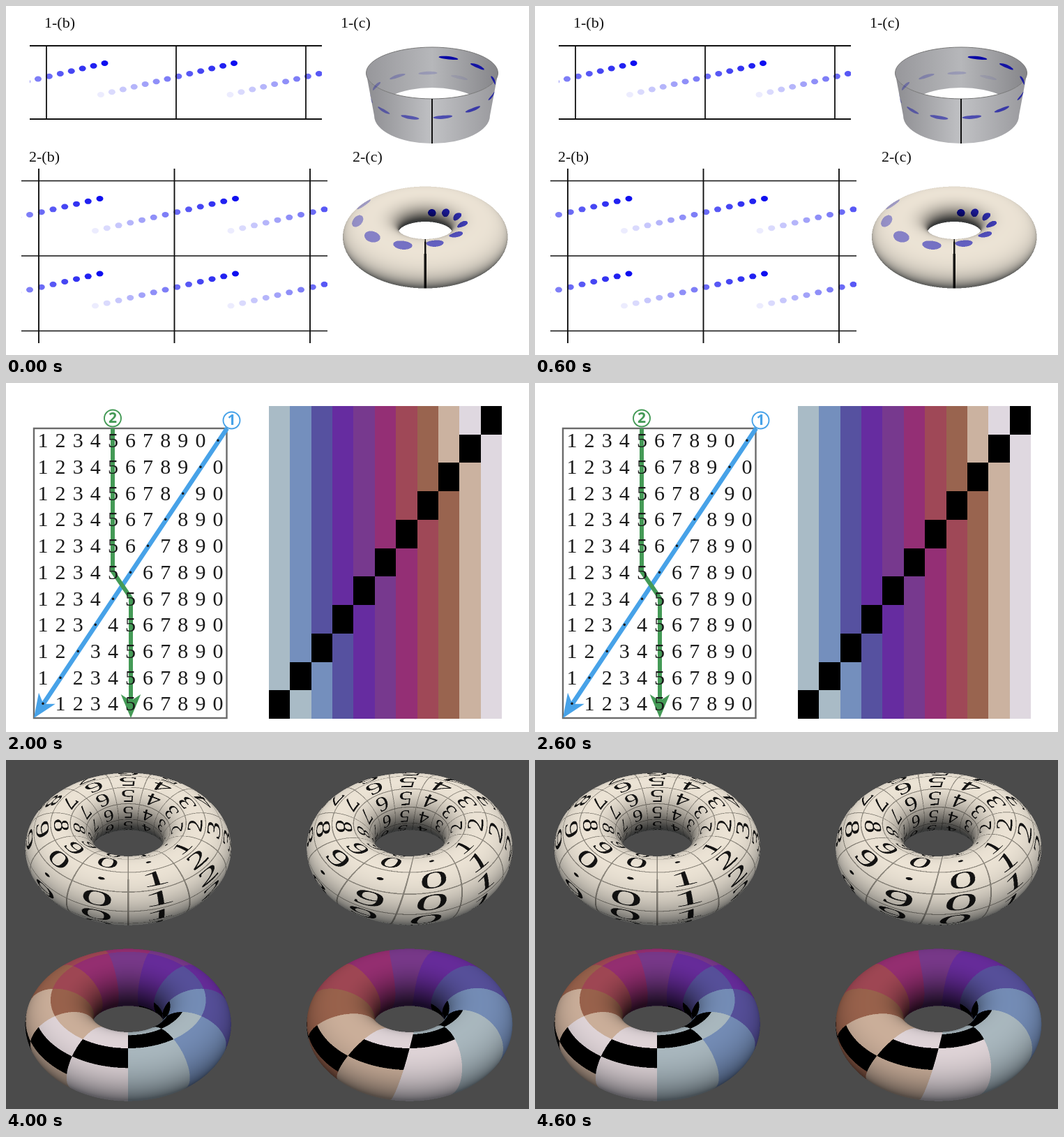
Recreate the animation shown at these times as an HTML page with a canvas. Size 750x500 px, loop 5000 ms.

```html
<!DOCTYPE html>
<html lang="en">
<head>
<meta charset="utf-8">
<title>Diagonal tables and tori</title>
<style>
html, body { margin: 0; width: 100%; height: 100%; overflow: hidden; background: #fff; }
canvas { display: block; }
</style>
</head>
<body>
<canvas id="stage" width="750" height="500"></canvas>
<script>
const W = 750, H = 500, HOLD = 1000, RAD = Math.PI / 180, STEP = 360 / 11;
const SERIF = '"Liberation Serif", "Noto Sans CJK JP", "Noto Sans CJK KR", "Noto Sans CJK", serif';
const COLORS = ['#000000', '#a9bbc6', '#748fbd', '#5651a0', '#662ca0', '#77398e',
  '#942f75', '#9f4857', '#99644f', '#cbb2a0', '#dfd8e0'];
const RGB = COLORS.map(c => [1, 3, 5].map(i => parseInt(c.slice(i, i + 2), 16)));
const mod = (a, n) => ((a % n) + n) % n;
const mix = (a, b, t) => a.map((k, i) => k + (b[i] - k) * t);
let g;

function makeCanvas(w, h) {
  const c = document.createElement('canvas');
  c.width = w;
  c.height = h;
  return c;
}

// Sheared table: 0 is the dot, 1 to 10 are the digits 1 to 9 and 0.
function cell(c, r) {
  const block = Math.floor(r / 10), k = mod(c - block, 11), gap = 10 - r + 10 * block;
  return k === gap ? 0 : k < gap ? k + 1 : k;
}
const label = n => n ? String(n % 10) : '·';

// ---- drawing helpers ----
function text(s, x, y, size, color = '#111', align = 'left') {
  g.font = `${size}px ${SERIF}`;
  g.fillStyle = color;
  g.textAlign = align;
  g.textBaseline = 'middle';
  g.fillText(s, x, y);
}
function line(points, color, width) {
  g.strokeStyle = color;
  g.lineWidth = width;
  g.beginPath();
  points.forEach(p => g.lineTo(...p));
  g.stroke();
}
function arrow(points, color, width, head) {
  const [x, y] = points.at(-1), [px, py] = points.at(-2);
  const a = Math.atan2(y - py, x - px);
  const end = [x - Math.cos(a) * head * .6, y - Math.sin(a) * head * .6];
  line([...points.slice(0, -1), end], color, width);
  g.save();
  g.translate(x, y);
  g.rotate(a);
  g.fillStyle = color;
  g.beginPath();
  [[0, 0], [-head, -head * .42], [-head * .72, 0], [-head, head * .42]].forEach(p => g.lineTo(...p));
  g.fill();
  g.restore();
}
function oval(x, y, rx, ry, color) {
  g.fillStyle = color;
  g.beginPath();
  g.ellipse(x, y, rx, ry, 0, 0, 7);
  g.fill();
}
function clipTo(x, y, w, h, draw) {
  g.save();
  g.beginPath();
  g.rect(x, y, w, h);
  g.clip();
  draw();
  g.restore();
}
function gradient(x0, x1, stops) {
  const f = g.createLinearGradient(x0, 0, x1, 0);
  stops.forEach((c, i) => f.addColorStop(i / (stops.length - 1), c));
  return f;
}
function grid(x, y, dx, dy, rows, put, inside = c => c < 11) {
  for (let r = 0; r < rows; r++)
    for (let c = 0; c < 23; c++)
      if (inside(c, r)) put(x + c * dx, y + r * dy, cell(c, r));
}
const digits = (size, color) => (x, y, n) => text(label(n), x, y, size, color, 'center');
const block = (w, h) => (x, y, n) => {
  const x0 = Math.round(x), y0 = Math.round(y);
  g.fillStyle = COLORS[n];
  g.fillRect(x0, y0, Math.round(x + w) - x0, Math.round(y + h) - y0);
};
const stepped = (c, r) => c >= (r > 10 ? 1 : 0) && c < (r < 10 ? 22 : 23);

// ---- torus, traced per pixel at double resolution ----
function torus({ x, y, size, tube, flat, tilt, dist, paint }) {
  const hw = Math.ceil(size * (1 + tube) * 1.06), hh = Math.ceil(size * 1.32);
  const w = hw * 4, h = hh * 4, canvas = makeCanvas(w, h), c2 = canvas.getContext('2d');
  const image = c2.createImageData(w, h), data = image.data;
  const ce = Math.cos(tilt * RAD), se = Math.sin(tilt * RAD);
  const oy = -dist * ce, oz = dist * se / flat, far = Math.hypot(oy, oz);
  for (let j = 0; j < h; j++) for (let i = 0; i < w; i++) {
    const sx = (i / 2 - hw) / size, sy = (hh - j / 2) / size;
    let dx = sx, dy = sy * se - oy, dz = sy * ce / flat - oz;
    const len = Math.sqrt(dx * dx + dy * dy + dz * dz);
    dx /= len; dy /= len; dz /= len;
    let t = far - 2.4, gap = 1, px, py, pz, q;
    for (let n = 0; n < 70 && gap > .001 && t < far + 2.4; n++) {
      px = dx * t; py = oy + dy * t; pz = oz + dz * t;
      q = Math.sqrt(px * px + py * py);
      gap = Math.sqrt((q - 1) * (q - 1) + pz * pz) - tube;
      t += gap;
    }
    if (gap > .004) continue;
    const v = Math.atan2(pz, q - 1), u = Math.atan2(py, px), cv = Math.cos(v), sv = Math.sin(v);
    const nz = sv / flat, lit = (.99 * nz - .12 * cv * py / q) / Math.sqrt(cv * cv + nz * nz);
    const hollow = Math.max(0, -cv) * (1 - sv) / 2;
    const shade = Math.max(.42, .56 + .44 * lit) * (1 - .65 * hollow);
    const color = paint(u / RAD, v / RAD), o = (j * w + i) * 4;
    for (let k = 0; k < 3; k++) data[o + k] = color[k] * (shade - .02 * k * lit);
    data[o + 3] = 255;
  }
  c2.putImageData(image, 0, 0);
  g.drawImage(canvas, x - hw, y - hh, hw * 2, hh * 2);
}

const CREAM = [236, 232, 222], INK = [20, 20, 20], GLYPH = 128;
let glyphs;
function makeGlyphs() {
  const c = makeCanvas(GLYPH * 11, GLYPH);
  g = c.getContext('2d', { willReadFrequently: true });
  for (let n = 0; n < 11; n++) text(label(n), (n + .5) * GLYPH, GLYPH * .54, GLYPH * 1.08, '#000', 'center');
  glyphs = g.getImageData(0, 0, c.width, GLYPH).data;
}

// Surface angles to table coordinates: closed table and sheared table.
const closed = (u, v) => [mod((u + 90) / STEP, 11), mod((78.6 - v) / STEP, 11)];
const sheared = (u, v) => {
  const r = (114.6 - v) / 36;
  return [9.9 + (u + 90) / STEP + r / 10, r];
};
const colored = map => (u, v) => {
  const [c, r] = map(u, v);
  return RGB[cell(Math.floor(c), Math.floor(r))];
};
const numbered = map => (u, v) => {
  const [c, r] = map(u, v), ci = Math.floor(c), ri = Math.floor(r), fx = c - ci, fy = r - ri;
  if (Math.min(fx, 1 - fx) < .013 || Math.min(fy, 1 - fy) < .022) return [142, 139, 131];
  const at = Math.floor(fy * GLYPH) * GLYPH * 11 + Math.floor((cell(ci, ri) + fx) * GLYPH);
  return mix(CREAM, INK, glyphs[at * 4 + 3] / 255);
};

// ---- a fading row of spots, flat or wound once around a surface ----
const SPOTS = [...Array(13).keys()];
const fade = i => (13 - i) / 13;
const turn = i => 31 * i - 75;

function trail(x, y, dx, dy) {
  SPOTS.forEach(i => oval(x - i * dx, y + i * dy, 5, 4, `rgba(14,14,240,${fade(i)})`));
}
function spotted(u, v) {
  if (Math.abs(u + 90) < .8) return INK;
  const i = SPOTS.find(i => {
    const du = mod(u + turn(i) + 180, 360) - 180, dv = v - 167 + 12.9 * i;
    return (du / 9) ** 2 + (dv / 13) ** 2 < 1;
  });
  return i === undefined ? CREAM : mix(CREAM, [16, 16, 190], fade(i));
}
function cylinder(x, y) {
  const ring = h => [x, y + 61 * h, 94.5 - 11.5 * h, 37 + 3 * h];
  const wall = (a, h) => {
    const [cx, cy, rx, ry] = ring(h);
    return [cx + rx * Math.cos(a * RAD), cy + ry * Math.sin(a * RAD)];
  };
  oval(...ring(0), gradient(x - 95, x + 95, ['#97979b', '#b6b7ba', '#858589']));
  g.save();
  g.clip();
  oval(...ring(1), '#fff');
  g.restore();
  g.beginPath();
  g.ellipse(...ring(0), 0, Math.PI, 0, true);
  g.ellipse(...ring(1), 0, 0, Math.PI);
  g.fillStyle = gradient(x - 95, x + 95, ['#8c8c90', '#c0c1c4', '#98989c']);
  g.fill();
  g.strokeStyle = '#777';
  g.lineWidth = 1;
  g.beginPath();
  g.ellipse(...ring(0), 0, 0, 7);
  g.stroke();
  line([wall(90, 0), wall(90, 1)], '#111', 2);
  SPOTS.forEach(i => {
    g.beginPath();
    for (let a = 0; a < 360; a += 15)
      g.lineTo(...wall(turn(i) + 9 * Math.cos(a * RAD), .24 + .036 * i + .038 * Math.sin(a * RAD)));
    g.fillStyle = `rgba(8,8,165,${fade(i)})`;
    g.fill();
  });
}

// ---- slides ----
function strips() {
  text('1-(b)', 55, 25, 22);
  text('1-(c)', 480, 25, 22);
  text('2-(b)', 33, 217, 22);
  text('2-(c)', 497, 217, 22);
  clipTo(34, 50, 419, 115, () => [141.5, 327, 512.5].forEach(x => trail(x, 82, 15.92, 3.75)));
  [57, 162].forEach(y => line([[34, y], [453, y]], '#111', 1.8));
  [58, 244, 430].forEach(x => line([[x, 57], [x, 162]], '#111', 1.8));
  clipTo(22, 233, 439, 250, () => [276, 383.5].forEach(y =>
    [134.5, 329, 523.5].forEach(x => trail(x, y, 16.75, 3.83))));
  [250.5, 358, 465.5].forEach(y => line([[22, y], [461, y]], '#111', 1.5));
  [47, 241.5, 436].forEach(x => line([[x, 233], [x, 483]], '#111', 1.9));
  cylinder(611, 96);
  torus({ x: 601, y: 320, size: 77, tube: .505, flat: .62, tilt: 32.7, dist: 6.7, paint: spotted });
}

// Everything below the title sits on one line pitch; the date shares the digit columns.
function page({ x, y, dx, dy, size, ink, head, title, intro, result, sign }) {
  const left = x - 15.5, row = r => y + r * dy;
  text(title, ...head, ink);
  text(intro, left, row(-1), size, ink);
  grid(x, y, dx, dy, 11, digits(18, ink));
  text(result, left, row(11), size, ink);
  [...'26·10·1931'].forEach((s, i) => text(s, x + i * dx, row(12), 18, ink, 'center'));
  text(sign, left, row(13), size, ink);
}
function bleed() {
  const words = 'つた後への時の前に出來る事の中で見るものを知る人は少ないと思ふ';
  g.save();
  g.scale(-1, 1);
  for (let i = 0; i < 18; i++)
    text(words.slice(i, i + 6 + (i * 7) % 9), -382, 22 + i * 27.2, 15.5, 'rgba(190,180,155,.25)');
  g.restore();
}
function pages() {
  clipTo(6, 20, 387, 466, () => {
    g.fillStyle = gradient(6, 393, ['#fefdf8', '#fbf8ee']);
    g.fillRect(0, 0, 400, 500);
    bleed();
  });
  page({
    x: 33, y: 110, dx: 17.15, dy: 27.15, size: 17.2, ink: '#4c4743', head: [107, 40, 25],
    title: '◈  測　量　3  :  2', intro: '或る患者の容態に關する問題。',
    result: '測量  3 : 2', sign: '以上　責任醫師　文谷'
  });
  page({
    x: 492, y: 107.5, dx: 16.1, dy: 27, size: 16.3, ink: '#111', head: [541, 33, 22],
    title: '◈  측　량　3  :  2', intro: '어떤환자의용태에관한문제.',
    result: '측량  3 : 2', sign: '상기　 책임의사　 문곡'
  });
}

const BLUE = '#47a2e8', GREEN = '#449a56';
function badge(s, x, y, color) {
  oval(x, y, 12, 12, '#fff');
  g.strokeStyle = color;
  g.lineWidth = 1.9;
  g.stroke();
  g.font = '700 21px "Open Sans", Inter, sans-serif';
  g.fillStyle = color;
  g.textAlign = 'center';
  g.textBaseline = 'middle';
  g.fillText(s, x, y + 1);
}
function table() {
  g.strokeStyle = '#6b6b6b';
  g.lineWidth = 2.4;
  g.strokeRect(40, 65, 276.5, 415);
  arrow([[317, 65], [40, 480]], BLUE, 6.5, 34);
  arrow([[153, 65], [153, 270], [179, 308], [179, 480]], GREEN, 6, 34);
  grid(53, 84.5, 25.1, 37.7, 11, digits(30, '#1a1a1a'));
  badge('2', 153, 50.5, GREEN);
  badge('1', 323.5, 53.5, BLUE);
  grid(377, 33, 30.36, 40.73, 11, block(30.36, 40.73));
}
function tiling() {
  g.strokeStyle = '#666';
  g.lineWidth = 1.4;
  [[22, 13], [182, 13], [36.5, 238], [196.5, 238]].forEach(([x, y]) => g.strokeRect(x, y, 160, 246));
  [[[182, 13], [22, 259]], [[342, 13], [36.5, 484]], [[357, 238], [196.5, 484]]]
    .forEach(p => arrow(p, BLUE, 4, 20));
  arrow([[87.5, 13], [87.5, 134], [103, 157], [103, 359], [118, 381], [118, 484]], GREEN, 3.6, 20);
  grid(29, 24.5, 14.6, 22.42, 21, digits(18, '#1a1a1a'), stepped);
  grid(392, 12, 15.08, 22.5, 21, block(15.08, 22.5), stepped);
}
function tori() {
  g.fillStyle = '#4b4b4b';
  g.fillRect(0, 0, W, H);
  [[175, closed], [578.5, sheared]].forEach(([x, map]) =>
    [[117.4, numbered], [369.4, colored]].forEach(([y, skin]) =>
      torus({ x, y, size: 98, tube: .49, flat: .87, tilt: 40.2, dist: 9.1, paint: skin(map) })));
}

makeGlyphs();
const slides = [strips, pages, table, tiling, tori].map(draw => {
  const c = makeCanvas(W, H);
  g = c.getContext('2d');
  g.fillStyle = '#fff';
  g.fillRect(0, 0, W, H);
  draw();
  return c;
});

const stage = document.getElementById('stage').getContext('2d');
const start = performance.now();
function show() {
  const i = Math.floor((performance.now() - start) / HOLD) % slides.length;
  stage.drawImage(slides[i], 0, 0);
  requestAnimationFrame(show);
}
show();
</script>
</body>
</html>
```
